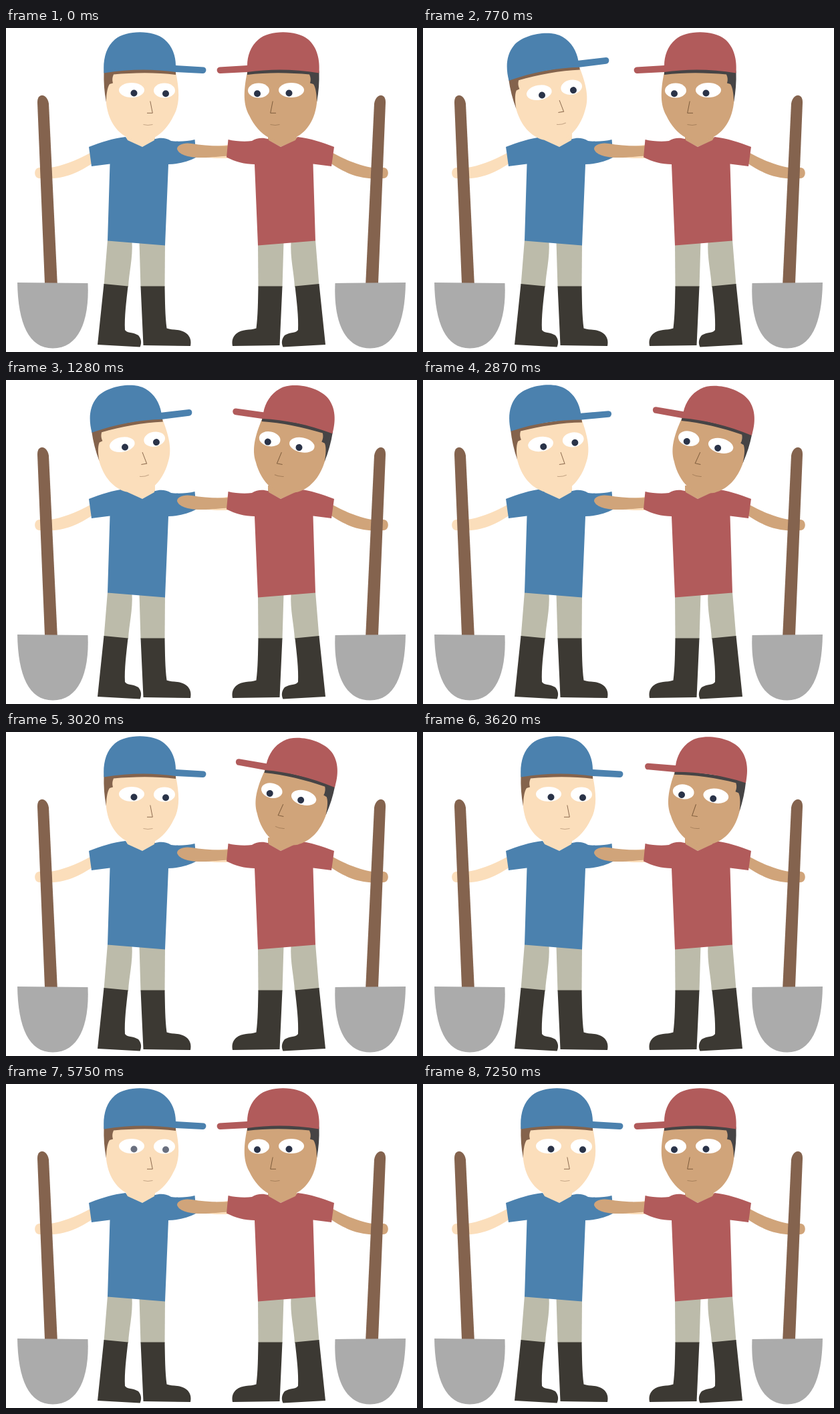
Animation of 615 by 485 pixels, one loop 8 s. Source, as an HTML page:

```html
<!DOCTYPE html>
<html lang="en">
<head>
<meta charset="utf-8">
<title>Two gardeners</title>
<style>
  html, body { margin: 0; width: 100%; height: 100%; overflow: hidden; background: #fff; }
  svg { display: block; width: 615px; height: 485px; }
  .skin { fill: var(--skin); }
  .hair { fill: var(--hair); }
  .cloth { fill: var(--cloth); }
  .line { fill: none; stroke: var(--line); }
  .pants { fill: #bcbbaa; }
  .boot { fill: #3c3933; }
  .handle { fill: #84634e; }
  .blade { fill: #ababab; }
  .white { fill: #fff; }
  .pupils { fill: #2a3348; }
  #blue { --skin: #fbdebb; --hair: #84634c; --cloth: #4b81ae; --line: #8d6c50; }
  #red { --skin: #d0a47a; --hair: #464445; --cloth: #b15b5b; --line: #7d5c3c; }
</style>
</head>
<body>
<svg id="stage" viewBox="0 0 615 485"></svg>
<script>
const LOOP = 8000, STEP = 30;

// One figure, facing right; the second is its mirror image about x = 307.5.
const figure = (id, mirror, armDrop) => `
<g id="${id}" ${mirror ? 'transform="translate(615 0) scale(-1 1)"' : ''}>
  <path class="skin" transform="translate(0 ${armDrop})" d="M280 176C300 177.5 320 176 337 173C349 171 359 175 359 181C357 189 343 194 325 194C310 194.5 297 192 280 191.5Z"/>
  <path class="skin" d="M126 187C104 199 82 207 66 209L50 209C41 209 41 225 50 225C85 228 108 217 130 202Z"/>
  <path class="handle" d="M58 382L47 112C46.500 97 61 97 64 113L76.800 382Z"/>
  <path class="blade" d="M17 381L122.500 382C125 440 108 479.500 70 479.500C34 479.500 18 442 17 381Z"/>
  <path class="pants" d="M152 317L188.500 319C190 345 184 365 183 388L146.500 385Z"/>
  <path class="pants" d="M199.500 320L238 322L237.500 388L201.500 388Z"/>
  <path class="boot" d="M146.500 383L182.500 386.500C180 410 177 432 178 452C181 457 190 455 198 460C203 466 203 472 200.500 477.500L137 474Z"/>
  <path class="boot" d="M201.500 386.500H237.500C238 410 238 430 240.500 449.500C250 453 262 450 271 458C277 464 277 470 276 476L205.500 475Z"/>
  <path class="skin" d="M180 158V168L204 178L223 168V158Z"/>
  <path class="cloth" d="M124 178C142 171 160 165 179 163L182 168L204 178L222 168V166.500C230 164 239 164 247 169C258 170.500 272 169.500 282.500 167L285 193.500C272 200 258 204 243 204L238 325.500L152 318.500L155.500 203.500L128 207Z"/>
  <g class="head">
    <path class="skin" d="M149 66L254 66C260 95 260 115 251 131C244 146 233 158 222 164C211 169 194 169 181 163.500C165 155 152 138 149.500 108Z"/>
    <path class="hair" d="M146.500 66C146 80 147 96 150 111C150 102 151 90 155 84L160 82.500Q158 76 161 69.500C190 66.500 225 66 254 70V62H147Z"/>
    <path class="cloth" d="M146.500 67.500C145 48 149 29 163 17C180 2.500 221 2.500 237 17C249 27 254 42 254 56L295.500 58.500Q300 59.500 299.300 64Q298 68.500 294 68L254 66C220 61 185 61 146.500 67.500Z"/>
    <ellipse class="white" cx="188" cy="93" rx="19" ry="11"/>
    <ellipse class="white" cx="237" cy="93.500" rx="16" ry="11"/>
    <g class="pupils"><circle cx="191.500" cy="97.500" r="5"/><circle cx="239" cy="98.300" r="5"/></g>
    <path class="line" d="M215.800 109.500L219.300 127.300H211"/>
    <path class="line" opacity=".5" d="M205.500 144.500Q212 146.500 219.500 144.500"/>
  </g>
</g>`;

document.getElementById('stage').innerHTML = figure('blue', false, 1) + figure('red', true, 0);

// tilts: [start ms, steps, from degrees, to degrees]
// blinks: [start ms, pupil opacity per step]
const actors = [
  { id: 'blue',
    tilts: [[500, 10, 0, -10], [2870, 6, -10, 0]],
    blinks: [[1580, [.7, .35, .05, .35, .7]], [5750, [.7, .3, .6]]] },
  { id: 'red',
    tilts: [[980, 13, 0, -13.2], [3530, 10, -13.2, 0]],
    blinks: [[7130, [.7, .3, .3, .7]]] },
];
for (const a of actors) {
  a.head = document.querySelector(`#${a.id} .head`);
  a.pupils = document.querySelector(`#${a.id} .pupils`);
}

const stepAt = (t, start) => Math.floor((t - start) / STEP);

function tiltAt(tilts, t) {
  let angle = 0;
  for (const [start, steps, from, to] of tilts) {
    if (t >= start) angle = from + (to - from) * Math.min(1, (stepAt(t, start) + 1) / steps);
  }
  return angle;
}

function pupilAt(blinks, t) {
  for (const [start, levels] of blinks) {
    const level = levels[stepAt(t, start)];
    if (level !== undefined) return level;
  }
  return 1;
}

const origin = performance.now();
function draw(now) {
  const t = Math.max(0, now - origin) % LOOP;
  for (const a of actors) {
    a.head.setAttribute('transform', `rotate(${tiltAt(a.tilts, t)} 202 176)`);
    a.pupils.setAttribute('opacity', pupilAt(a.blinks, t));
  }
  requestAnimationFrame(draw);
}
draw(origin);
</script>
</body>
</html>
```
